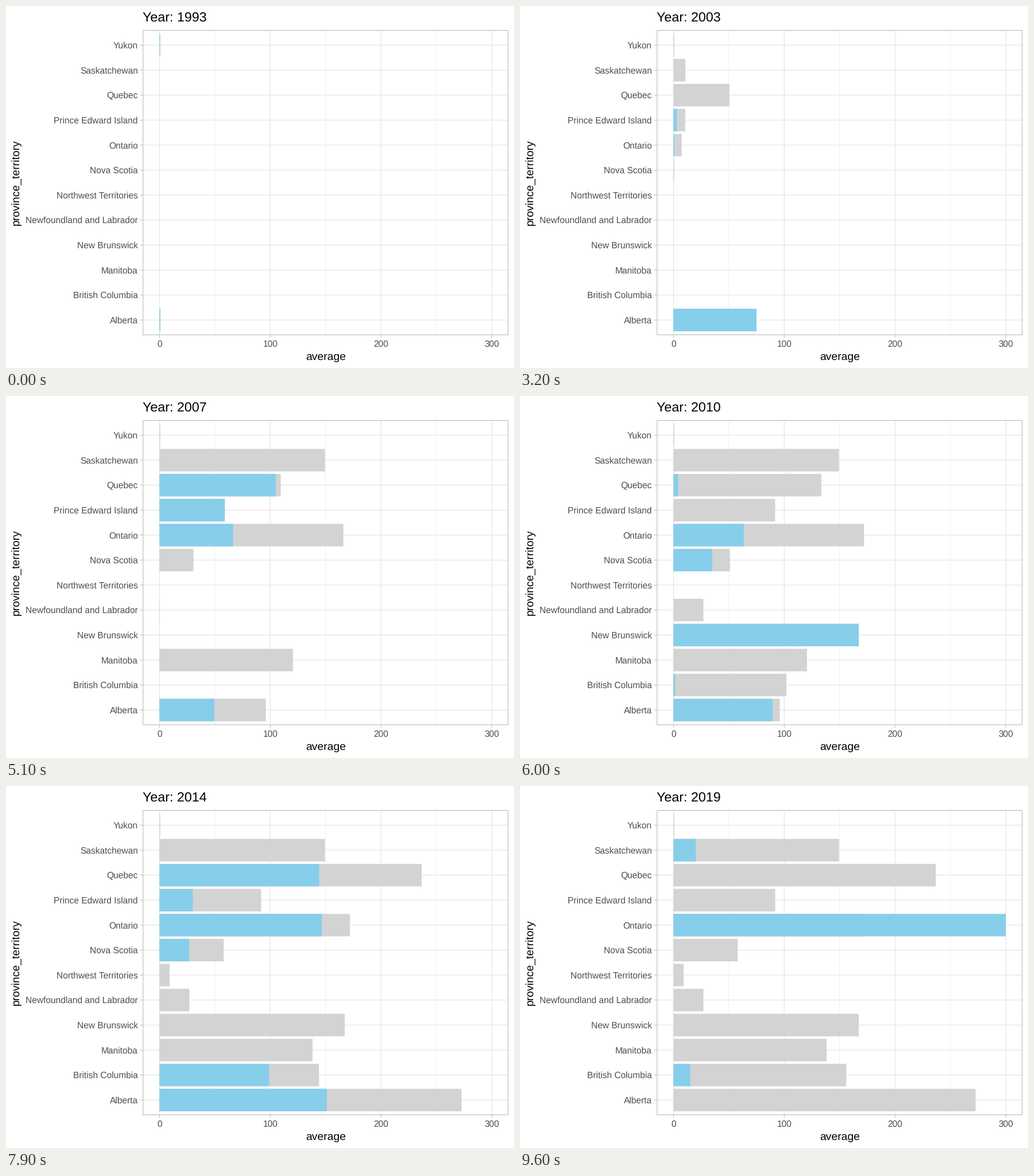
A matplotlib script for the animation above (10000 ms loop, 885x632 px).

```python
import matplotlib.pyplot as plt
from matplotlib.animation import FuncAnimation
from matplotlib.patches import Rectangle

W, H, DPI = 885, 632, 100
LEFT, RIGHT, TOP, BOTTOM = 238.4, 875.2, 42.2, 574.4
STEP = (BOTTOM - TOP) / 12.2
GRID, EDGE, PAST, NOW = "#dedede", "#b3b3b3", "#d3d3d3", "#87ceeb"
HOLD = 4  # frames per year, the last one is the in-between

PLACES = {
    "A": "Alberta", "BC": "British Columbia", "M": "Manitoba",
    "NB": "New Brunswick", "NL": "Newfoundland and Labrador",
    "NT": "Northwest Territories", "NS": "Nova Scotia", "O": "Ontario",
    "PE": "Prince Edward Island", "Q": "Quebec", "S": "Saskatchewan",
    "Y": "Yukon",
}

DATA = {
    1993: dict(A=0.9, Y=0.7),
    1995: dict(O=0.6),
    1997: dict(A=44),
    1998: dict(A=3.5),
    1999: dict(Q=50.5),
    2000: dict(A=3, Y=0.7),
    2001: dict(A=43.5, S=10.8, PE=10.6),
    2002: dict(A=70.5, O=7.5, NS=0.7),
    2003: dict(A=75, O=0.8, PE=3),
    2004: dict(A=96, NL=0.4, Q=54),
    2005: dict(A=30, M=120.5, NS=30.7, Q=54),
    2006: dict(A=62, O=166, Q=109.5, S=149.4),
    2007: dict(A=68, O=10, PE=59, Q=100.5),
    2008: dict(A=31, NB=167.3, O=123, Q=109.5),
    2009: dict(A=66, BC=102, NB=99, NL=27, NS=51, O=172, PE=91.8, Q=133.5),
    2010: dict(A=89.5, BC=1.5, NB=167.3, NS=35, O=63.5, Q=4.2),
    2011: dict(A=75, BC=144, M=138.2, NB=45, NS=58, O=85, Q=157.4, S=26),
    2012: dict(A=128.8, BC=142.5, NS=27.8, NT=9.2, O=30.5, Q=120),
    2013: dict(BC=99, NS=5, O=72, Q=235.7),
    2014: dict(A=272.7, BC=99, NS=22, O=140.6, PE=30.2, Q=236.8),
    2015: dict(A=29.3, NS=31.6, O=152.4, Q=51.4),
    2016: dict(NS=14, O=60, Q=147),
    2017: dict(BC=156, O=100, Q=147),
    2018: dict(NB=167.3, O=88, Q=191),
    2019: dict(BC=15.2, O=300, S=20.2),
}
YEARS = list(DATA)

plt.rcParams["font.family"] = "Liberation Sans"
plt.rcParams["text.hinting"] = "no_hinting"

fig = plt.figure(figsize=(W / DPI, H / DPI), dpi=DPI, facecolor="white")
ax = fig.add_axes([0, 0, 1, 1])
ax.set_xlim(0, W)
ax.set_ylim(H, 0)
ax.axis("off")


def pt(px):
    return px * 72 / DPI


def x_of(value):
    return LEFT + (value + 15) / 330 * (RIGHT - LEFT)


def y_of(row):
    return BOTTOM - (row + 0.6) * STEP


def line(xs, ys, color, width=0.94):
    ax.plot(xs, ys, color=color, lw=pt(width), zorder=1, snap=False,
            solid_capstyle="butt")


def label(x, y, text, px, color="black", **kw):
    return ax.text(x, y, text, fontsize=pt(px), color=color, va="baseline",
                   **kw)


def make_bars(color, z):
    bars = {}
    for row, key in enumerate(PLACES):
        top = y_of(row) - 0.45 * STEP
        bars[key] = Rectangle((x_of(0), top), 0, 0.9 * STEP, fc=color,
                              ec="none", lw=0, zorder=z, snap=False)
        ax.add_patch(bars[key])
    return bars


for v in (50, 150, 250):
    line([x_of(v)] * 2, [TOP, BOTTOM], GRID, 0.5)
for v in (0, 100, 200, 300):
    line([x_of(v)] * 2, [TOP, BOTTOM], GRID)
    line([x_of(v)] * 2, [BOTTOM, BOTTOM + 4.85], EDGE)
    label(x_of(v), 594.8, str(v), 15.5, "#4d4d4d", ha="center")
for row, name in enumerate(PLACES.values()):
    y = y_of(row)
    line([LEFT, RIGHT], [y, y], GRID)
    line([LEFT - 4.85, LEFT], [y, y], EDGE)
    label(229.7, y + 5.6, name, 15.5, "#4d4d4d", ha="right")

ax.add_patch(Rectangle((LEFT + 0.4, TOP + 0.4), RIGHT - LEFT - 0.8,
                       BOTTOM - TOP - 0.8, fc="none", ec=EDGE, lw=pt(1),
                       zorder=5, snap=False))
label(557, 618, "average", 19.4, ha="center")
label(23, 308.3, "province_territory", 19.4, ha="center", rotation=90,
      rotation_mode="anchor")
title = label(LEFT, 27, "", 23.27, ha="left")

past_bars = make_bars(PAST, 2)
now_bars = make_bars(NOW, 3)


def update(frame):
    i, phase = divmod(frame, HOLD)
    between = phase == HOLD - 1 and i + 1 < len(YEARS)
    now = DATA[YEARS[i]]
    after = DATA[YEARS[i + 1]] if between else now
    seen = [DATA[y] for y in YEARS[:i + between]]
    for key in PLACES:
        value = now.get(key, 0)
        # bars present in both years meet halfway; others wait
        if key in now and key in after:
            value = (value + after[key]) / 2
        best = max((d.get(key, 0) for d in seen), default=0)
        now_bars[key].set_width(x_of(value) - x_of(0))
        past_bars[key].set_width(x_of(best) - x_of(0))
    title.set_text(f"Year: {YEARS[i]}")
    return [title, *past_bars.values(), *now_bars.values()]


anim = FuncAnimation(fig, update, frames=HOLD * len(YEARS), interval=100,
                     repeat=True, repeat_delay=0)
plt.show()
```
